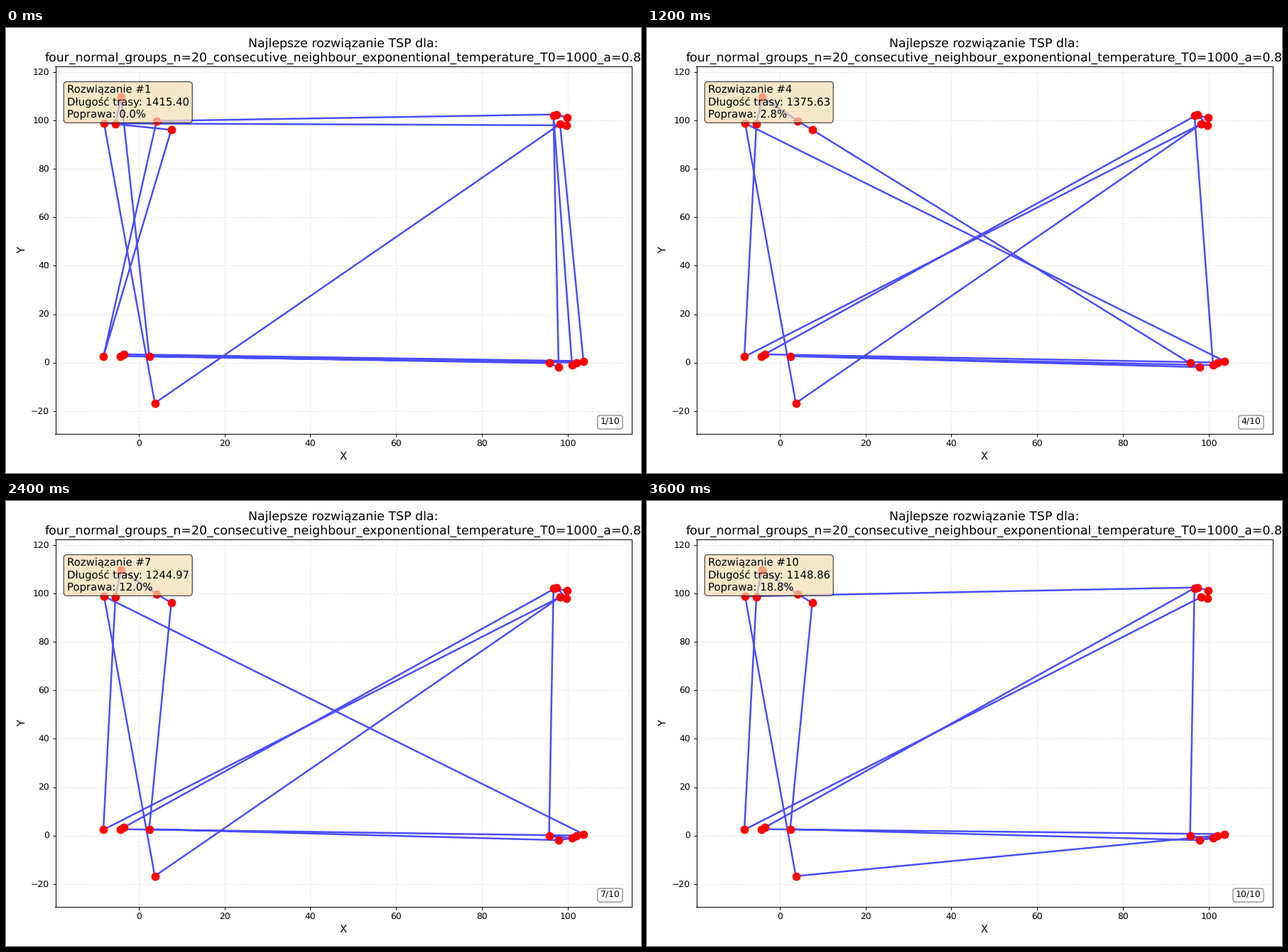
A matplotlib script that plays this animation: 894x626 px, repeating every 4000 ms.

```python
import matplotlib.pyplot as plt
from matplotlib.animation import FuncAnimation

plt.rcParams["text.hinting"] = "none"  # keep line heights fractional

DPI = 89.4
WIDTH, HEIGHT = 894, 626

CITIES = {
    # top left
    "A": (-8.04, 98.8), "B": (-5.4, 98.5), "C": (-4.07, 109.65),
    "D": (4.2, 99.8), "E": (7.61, 96.15),
    # top right
    "F": (96.65, 102.2), "G": (97.4, 102.5), "H": (99.88, 101.1),
    "I": (98.18, 98.5), "J": (99.63, 98.0),
    # bottom left
    "K": (-8.2, 2.4), "L": (-4.24, 2.65), "M": (-3.4, 3.4),
    "N": (2.47, 2.64), "O": (3.79, -16.74),
    # bottom right
    "P": (95.63, -0.25), "Q": (97.85, -1.9), "R": (100.98, -1.1),
    "S": (101.97, 0.0), "T": (103.64, 0.6),
}

# visiting order and route length of each improved solution
TOURS = [
    ("DGHJAOITMLSRFQPNCBEK", 1415.40),
    ("KJHIOATMLGFRQNSPEDCB", 1379.29),
    ("KIOATMLGJHFRSNQPEDCB", 1377.94),
    ("KIOATSMLGJHFRNQPEDCB", 1375.63),
    ("KIOATSLMGJHFRNQPEDCB", 1375.12),
    ("KIOATSLMGJHFRQNPEDCB", 1370.21),
    ("KIOATSLMGJHFPRQNEDCB", 1244.97),
    ("KIJGHAOTSLMFPRQNEDCB", 1153.47),
    ("KIJHGAOTSLMFPRQNEDCB", 1149.07),
    ("KIJHGAOSTLMFPRQNEDCB", 1148.86),
]
FIRST = TOURS[0][1]


def padded(values, share=0.1):
    lo, hi = min(values), max(values)
    pad = share * (hi - lo)
    return lo - pad, hi + pad


xs, ys = zip(*CITIES.values())

# a hundredth of a pixel guards against rounding down
fig, ax = plt.subplots(figsize=(10, (HEIGHT + 0.01) / DPI), dpi=DPI)
fig.subplots_adjust(
    left=69.5 / WIDTH, right=880.6 / WIDTH,
    bottom=1 - 570.7 / HEIGHT, top=1 - 54.2 / HEIGHT,
)
ax.set_xlim(*padded(xs))
ax.set_ylim(*padded(ys))
ax.grid(True, linestyle="--", alpha=0.3)
ax.set_xlabel("X", fontsize=12)
ax.set_ylabel("Y", fontsize=12)
ax.set_title(
    "Najlepsze rozwiązanie TSP dla:\n"
    "four_normal_groups_n=20_consecutive_neighbour_"
    "exponentional_temperature_T0=1000_a=0.8",
    fontsize=14,
)

route, = ax.plot([], [], "b-", linewidth=2, alpha=0.7)
ax.scatter(xs, ys, c="red", s=72, zorder=2.5)
info = ax.text(
    0.02, 0.95, "", transform=ax.transAxes, fontsize=12, va="top",
    bbox=dict(boxstyle="round", facecolor="wheat", alpha=0.7),
)
counter = ax.text(
    0.98, 0.02, "", transform=ax.transAxes, fontsize=10,
    ha="right", va="bottom",
    bbox=dict(boxstyle="round", facecolor="white", alpha=0.5),
)


def update(i):
    order, length = TOURS[i]
    route.set_data(*zip(*(CITIES[c] for c in order + order[0])))
    gain = 100 * (FIRST - length) / FIRST
    info.set_text(
        f"Rozwiązanie #{i + 1}\n"
        f"Długość trasy: {length:.2f}\n"
        f"Poprawa: {gain:.1f}%"
    )
    counter.set_text(f"{i + 1}/{len(TOURS)}")
    return route, info, counter


anim = FuncAnimation(fig, update, frames=len(TOURS), interval=400, repeat=True)
plt.show()
```
